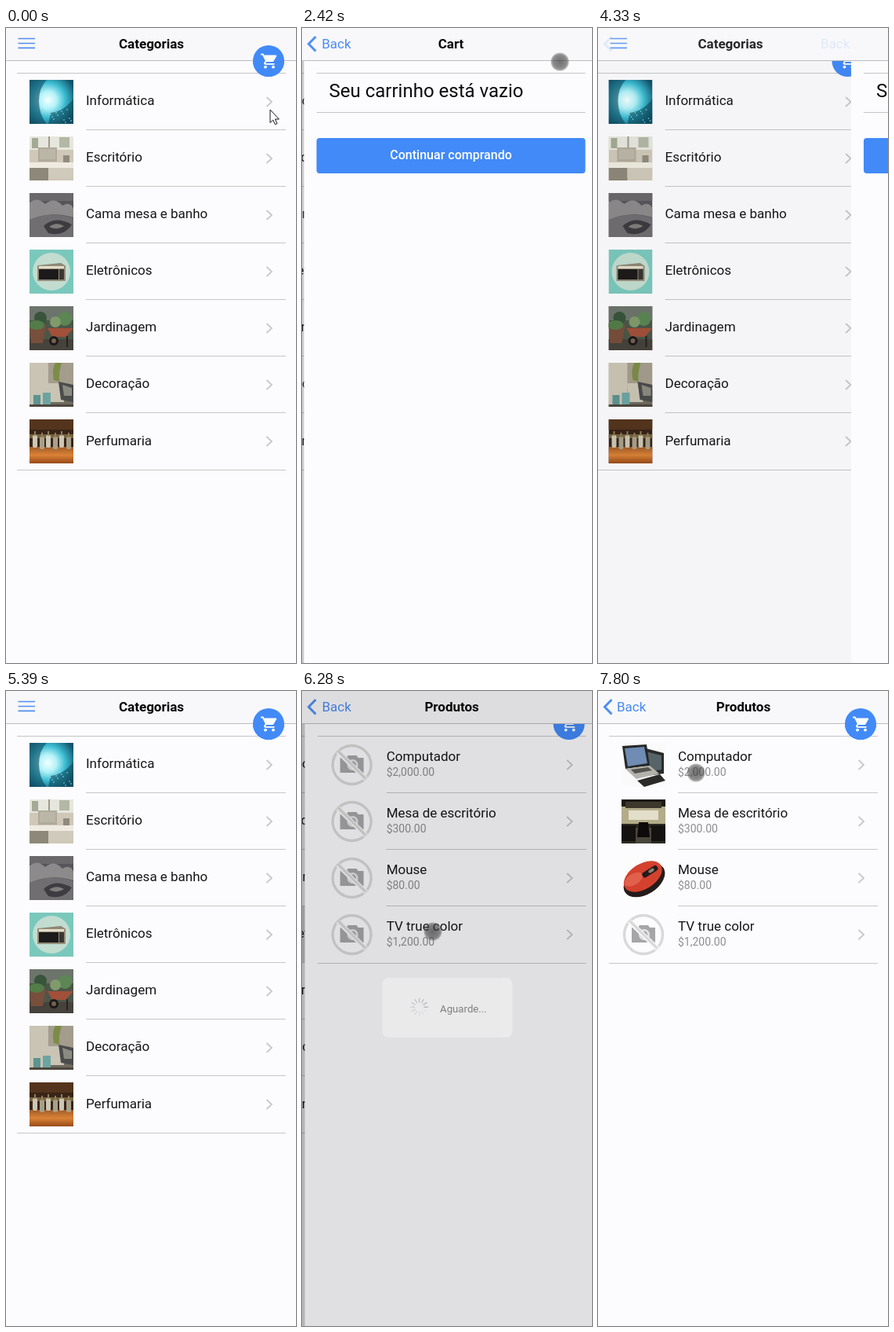
An HTML page that plays this animation: 370 by 808 pixels, repeating every 8 s.

```html
<!DOCTYPE html>
<html lang="pt">
<head>
<meta charset="utf-8">
<title>Categorias</title>
<style>
html, body { margin: 0; width: 100%; height: 100%; overflow: hidden; background: #fcfcfe; }
svg { display: block; width: 100%; height: 100%; font: 17px Roboto, Arial, sans-serif; }
.title { font-weight: 600; text-anchor: middle; fill: #060608; }
.name { fill: #161618; }
.price { font-size: 14px; fill: #8e8e93; }
.line { stroke: #c6c5c8; stroke-width: 1; }
.chev { fill: none; stroke: #c8c7cc; stroke-width: 1.8; }
.blue { fill: none; stroke: #508ef0; }
</style>
</head>
<body>
<svg id="stage" viewBox="0 0 370 808"></svg>
<script>
const LOOP = 8000;
const W = 375, EDGE = -2;   // the page is a little wider than the stage
const BLUE = '#428af8';

// ---- drawing helpers ----
const rect = (x, y, w, h, fill, rx = 0) =>
  `<rect x="${x}" y="${y}" width="${w}" height="${h}" fill="${fill}" rx="${rx}"/>`;
const disc = (x, y, r, fill) => `<circle cx="${x}" cy="${y}" r="${r}" fill="${fill}"/>`;
const oval = (x, y, rx, ry, fill) => `<ellipse cx="${x}" cy="${y}" rx="${rx}" ry="${ry}" fill="${fill}"/>`;
const path = (d, fill) => `<path d="${d}" fill="${fill}"/>`;
const text = (x, y, s, cls) => `<text x="${x}" y="${y}" class="${cls}">${s}</text>`;
const line = (y, x = 14) => `<path class="line" d="M${x} ${y + .5}H357"/>`;
const chevron = y => `<path class="chev" d="M332.5 ${y - 6}l6.5 6l-6.5 6"/>`;
const group = (id, s) => `<g id="${id}">${s}</g>`;
const thumb = (i, s) => `<svg x="30" y="${66 + 72 * i}" width="56" height="56">${s}</svg>`;

const fab = disc(335, 42, 20, BLUE) +
  `<g transform="translate(323 30)" fill="#fff">
    <path d="M2.2 2.4h3.2l.9 2h15q1.3.3.9 1.4l-3.6 6.3q-.6 1-1.7 1H9.2l-1.1 1.8H19.5v1.9H8q-2.6-.4-1.7-2.7l1.5-2.4L4.2 4.4h-2z"/>
    <circle cx="8" cy="19.6" r="1.95"/><circle cx="18" cy="19.6" r="1.95"/></g>`;

// ---- pictures, each 56 x 56 ----
const glow = rect(0, 0, 56, 56, 'url(#glow)') +
  path('M0 0H22Q12 10 12 27Q12 44 22 56H0z', '#0e465c99') +
  path('M27 42Q44 40 56 24V56H24z', '#0d4a5c99') +
  Array.from({ length: 14 }, (_, i) => disc(26 + i * 17 % 29, 36 + i * 7 % 19, .8, '#8fe6f0')).join('');

const office = rect(0, 0, 56, 56, '#cfc8b8') + rect(0, 0, 56, 17, '#e6e6de') +
  rect(3, 2, 8, 13, '#a4aa94') + rect(38, 1, 13, 13, '#b2b8a4') + rect(24, 0, 2, 16, '#9c988c') +
  rect(11, 14, 24, 18, '#b0aa9a') + rect(13, 16, 20, 13, '#bcb6a8') + rect(0, 33, 56, 7, '#efebe0') +
  rect(0, 40, 24, 16, '#8e887a') + rect(24, 40, 32, 12, '#d0cabc') + rect(43, 24, 8, 9, '#908a7e');

const bed = rect(0, 0, 56, 56, '#57555a') + rect(0, 0, 56, 10, '#6a686a') +
  path('M0 12Q10 4 20 14Q32 4 42 16Q52 10 56 20V31Q28 22 0 34z', '#8c8a8a') +
  path('M0 34Q28 22 56 32V56H0z', '#706e70') + path('M18 42Q32 28 54 40Q44 56 24 51z', '#3e3c40') +
  path('M25 43Q34 36 44 42Q36 48 25 43z', '#807e7c');

const radio = rect(0, 0, 56, 56, '#7ac8bc') + disc(28, 28, 24, '#c2dcd0') +
  path('M11 20L40 17L45 20z', '#8a8672') + rect(10, 20, 36, 20, '#948c78', 1) +
  rect(12, 25, 25, 13, '#1c1a1a') + rect(12, 21, 32, 3, '#e2dcc8') + rect(38, 25, 6, 13, '#3a3632');

const garden = rect(0, 0, 56, 56, '#4c5648') + rect(0, 0, 56, 18, '#6c746c') +
  disc(14, 15, 8, '#38543a') + disc(45, 16, 9, '#5c8654') + disc(33, 20, 7, '#809a6c') +
  rect(0, 42, 56, 14, '#46423c') + path('M0 25H21L17 47H2z', '#784e3c') +
  path('M23 28H56L46 39H29z', '#a2503a') +
  oval(9, 24, 10, 6, '#527c48') + disc(31, 44, 6, '#1c1a1a') + disc(31, 44, 3, '#75604c') + rect(47, 38, 2, 14, '#26221f');

const decor = rect(0, 0, 56, 56, '#a49c8c') + rect(0, 0, 24, 56, '#c9c4b4') +
  rect(24, 34, 32, 22, '#6e6a5e') + path('M31 22Q28 8 33 0H41Q37 12 38 24z', '#7c8c48') +
  path('M24 26H42L44 50H24z', '#cac4b4') + path('M37 24L56 28V50L40 47z', '#4a4c4c') +
  path('M42 28L54 32V42L44 42z', '#8c8a80') + rect(5, 41, 9, 15, '#5c9492') +
  rect(17, 38, 10, 18, '#6ca4a2') + rect(0, 53, 56, 3, '#4e483e');

const perfume = rect(0, 0, 56, 56, '#382418') + rect(0, 0, 56, 13, '#54341c') +
  rect(0, 35, 56, 21, 'url(#wood)') + rect(0, 19, 56, 5, '#78643f') +
  [4, 13, 21, 30, 38, 47].map((x, i) => rect(x, 20 + i % 2 * 2, 6, 16, i % 2 ? '#a8a08a' : '#ccc6b4', 2) +
    rect(x + 2, 15 + i % 2 * 2, 2, 6, '#8e8058')).join('');

const laptop = rect(0, 0, 56, 56, '#fafafa') + path('M27 6L54 13V39L33 42z', '#2a2a2a') +
  path('M31 11L51 16V34L35 37z', '#566468') + path('M1 4L32 2L36 29L5 33z', '#262826') +
  path('M4 7L29 5L33 26L8 30z', '#6e8cb4') + path('M5 33L36 29L48 39L19 46z', '#b4b2ac') +
  path('M12 34L34 31L39 35L17 39z', '#55534e') + path('M20 48L49 40L56 48L29 56z', '#2c2a28');

const desk = rect(0, 0, 56, 56, '#2e2a20') + rect(0, 0, 56, 9, '#1c1a14') +
  rect(0, 9, 56, 22, '#b2ac88') + rect(5, 3, 46, 8, '#3c382c') + rect(9, 14, 38, 12, '#e2deca') +
  rect(0, 33, 19, 20, '#141210') + rect(37, 33, 19, 20, '#141210') +
  rect(18, 36, 20, 20, '#4a463c') + path('M22 29H34L36 48H20z', '#0c0a0a');

const mouse = rect(0, 0, 56, 56, '#fcfcfc') +
  `<g transform="rotate(-32 28 29)">${oval(28, 31, 29, 18, '#241c1a')}${oval(29, 26, 27, 16, '#d4412e')}
  ${oval(17, 23, 13, 7, '#e0604c')}${rect(29, 22, 22, 7, '#261a18', 3)}${rect(38, 23.5, 8, 4, '#888078', 2)}</g>`;

const noPhoto = `<g fill="none" stroke="#d9d9da" stroke-width="3.4"><circle cx="28" cy="28" r="24.5"/></g>` +
  path('M13 19H21L23 16H34L36 19H43V38H13z', '#a6a6a8') + disc(29, 28, 7, '#e4e4e4') + disc(29, 28, 4.4, '#a6a6a8') +
  `<path d="M10 11L46 46" stroke="#fafafc" stroke-width="6"/><path d="M10.5 10.5L45.5 45.5" stroke="#d9d9da" stroke-width="3.4"/>`;

// ---- pages ----
const categories = [
  ['Informática', glow], ['Escritório', office], ['Cama mesa e banho', bed], ['Eletrônicos', radio],
  ['Jardinagem', garden], ['Decoração', decor], ['Perfumaria', perfume]];
const products = [
  ['Computador', '$2,000.00', laptop, 6600], ['Mesa de escritório', '$300.00', desk, 6700],
  ['Mouse', '$80.00', mouse, 6800], ['TV true color', '$1,200.00']];

const frame = n => line(57) + line(58 + 72 * n) +
  Array.from({ length: n }, (_, i) => (i ? line(57 + 72 * i, 102) : '') + chevron(94 + 72 * i)).join('');

const bodies = {
  cat: `<rect id="pressed" x="14" y="274" width="343" height="72" fill="#d9d9d9"/>` + frame(7) +
    categories.map(([name, pic], i) => thumb(i, pic) + text(102, Math.round(98 + 72.09 * i), name, 'name')).join('') + fab,
  cart: line(57) + line(107) +
    `<text x="30" y="88" font-size="24" fill="#0c0c0e">Seu carrinho está vazio</text>` +
    rect(14, 140, 343, 45, BLUE, 4) +
    `<text x="185.5" y="167" font-size="16" font-weight="500" text-anchor="middle" fill="#fff">Continuar comprando</text>`,
  prod: frame(4) + products.map(([name, price, pic], i) =>
    thumb(i, noPhoto) + (pic ? group('photo' + i, thumb(i, pic)) : '') +
    text(102, 89 + 72 * i, name, 'name') + text(102, 108 + 72 * i, price, 'price')).join('') + fab
};
const titles = { cat: 'Categorias', cart: 'Cart', prod: 'Produtos' };
const pages = Object.keys(titles);

const menuIcon = `<path class="blue" stroke-width="1.7" d="M15.5 13.5h21.5M15.5 19.5h21.5M15.5 25.3h21.5"/>`;
const backIcon = `<path class="blue" stroke-width="3" d="M17.5 11L8.5 20.2L17.5 29.5"/>`;

const loader = rect(-88, -40, 176, 80, '#f9f9f9', 8) +
  `<g id="spinner" transform="translate(-38 -1)">` +
  Array.from({ length: 12 }, (_, i) =>
    `<path d="M0 -6.5V-11.5" stroke="#69717d" stroke-width="1.3" stroke-linecap="round" transform="rotate(${i * 30})"/>`).join('') +
  `</g><text x="-10" y="6" font-size="14">Aguarde...</text>`;

const stage = document.getElementById('stage');
stage.innerHTML = `<defs>
  <radialGradient id="glow" cx=".42" cy=".46" r=".66"><stop offset="0" stop-color="#f2ffff"/>
    <stop offset=".3" stop-color="#b4f2f8"/><stop offset=".6" stop-color="#3cbcd2"/><stop offset="1" stop-color="#12546c"/></radialGradient>
  <linearGradient id="wood" x2="0" y2="1"><stop stop-color="#a05c28"/><stop offset=".5" stop-color="#da8236"/><stop offset="1" stop-color="#984a18"/></linearGradient>
  <radialGradient id="touch"><stop offset="0" stop-color="#303030" stop-opacity=".68"/>
    <stop offset=".75" stop-color="#404040" stop-opacity=".6"/><stop offset="1" stop-color="#606060" stop-opacity=".4"/></radialGradient>
  </defs>` +
  pages.map(p => group(p, rect(EDGE, 0, W, 808, '#fcfcfe') + bodies[p] +
    `<rect id="${p}Dim" x="${EDGE}" width="${W}" height="808"/>`)).join('') +
  rect(0, 0, 370, 41, '#f8f8fa') + rect(0, 41, 370, 1, '#bcbcc0') +
  pages.map(p => group(p + 'Title', text(185.5, 26, titles[p], 'title')) +
    group(p + 'Icon', p === 'cat' ? menuIcon : backIcon) +
    (p === 'cat' ? '' : group(p + 'Back', `<text x="24" y="26" fill="#488af4">Back</text>`))).join('') +
  group('fab', fab) +
  `<rect id="shade" width="370" height="808"/>` +
  group('loader', loader) +
  `<circle id="touchDot" r="11.5" fill="url(#touch)"/>` +
  `<path id="arrow" d="M337 104V120.5L340.8 117L343.4 122.8L346 121.6L343.4 116H348.4z" fill="#fff" stroke="#18181a"/>`;

const el = {};
stage.querySelectorAll('[id]').forEach(n => el[n.id] = n);

// ---- motion ----
const clamp = v => Math.min(1, Math.max(0, v));
const smooth = v => v * v * (3 - 2 * v);
const span = (t, from, length) => clamp((t - from) / length);

// cubic-bezier(.32, .72, 0, 1)
function glide(x) {
  let lo = 0, hi = 1, s = x;
  for (let i = 0; i < 24; i++) {
    s = (lo + hi) / 2;
    if (.96 * s * (1 - s) ** 2 + s ** 3 < x) lo = s; else hi = s;
  }
  return 2.16 * s * (1 - s) ** 2 + 3 * s * s * (1 - s) + s ** 3;
}

const moves = [
  { at: 2045, over: 'cart' }, { at: 4158, over: 'cart', back: true }, { at: 5920, over: 'prod' }];

const trails = [
  [[130, 338, 110], [930, 335, 70], [1270, 329, 43], [3220, 329, 43]],
  [[5600, 140, 140], [5860, 167, 306], [6450, 167, 306], [7170, 118, 180], [7380, 118, 180],
   [7420, 97, 140], [7670, 97, 140], [7800, 125, 104], [8000, 125, 104]]];

function show(id, opacity, x = 0) {
  el[id].style.display = opacity > 0 ? '' : 'none';
  el[id].setAttribute('opacity', opacity);
  el[id].setAttribute('transform', `translate(${x} 0)`);
}

function placePages(t) {
  const move = moves.filter(m => t >= m.at).pop() || { at: -1e4, over: 'cart', back: true };
  const p = span(t, move.at, 540), e = p < 1 ? glide(p) : 1;
  const k = move.back ? 1 - e : e, over = move.over;
  for (const id of pages) {
    const on = id === over ? k : id === 'cat' ? 1 - k : 0;
    const x = id === 'cat' ? -.33 * W * k : W * (1 - k);
    show(id, on > 0 ? 1 : 0, x);
    show(id + 'Dim', id === 'cat' ? .2 * k : 0);
    show(id + 'Title', clamp(1.1 * on - .1), x);
    show(id + 'Icon', on);
    if (id !== 'cat') show(id + 'Back', on, (move.back ? 300 : 100) * (1 - k));
  }
  show('fab', p === 1 && (k === 0 || over === 'prod') ? 1 : 0);
}

function placeLoader(t) {
  const enter = smooth(span(t, 5950, 200)), leave = smooth(span(t, 6172, 200));
  const on = enter * (1 - leave);
  show('shade', .25 * on);
  show('loader', on);
  const scale = 1.1 - .1 * enter - .1 * leave;
  el.loader.setAttribute('transform', `translate(185.5 403) scale(${scale})`);
  const step = Math.floor(t / 83);
  [...el.spinner.children].forEach((n, i) =>
    n.setAttribute('opacity', 1 - .075 * ((step - i + 1200) % 12)));
}

function placePointer(t) {
  show('arrow', t < 130 ? 1 : 0);
  const trail = trails.find(k => t >= k[0][0] && t < k[k.length - 1][0]);
  show('touchDot', trail ? 1 : 0);
  if (!trail) return;
  const i = trail.findIndex(k => t < k[0]);
  const [t0, x0, y0] = trail[i - 1], [t1, x1, y1] = trail[i];
  const p = smooth((t - t0) / (t1 - t0));
  el.touchDot.setAttribute('transform', `translate(${x0 + (x1 - x0) * p} ${y0 + (y1 - y0) * p})`);
}

function render(t) {
  placePages(t);
  placeLoader(t);
  placePointer(t);
  show('pressed', t >= 5880 && t < 6500 ? 1 : 0);
  products.forEach(([, , pic, at], i) => pic && show('photo' + i, t >= at ? 1 : 0));
}

const start = performance.now();
function tick() {
  render((performance.now() - start) % LOOP);
  requestAnimationFrame(tick);
}
tick();
</script>
</body>
</html>
```
